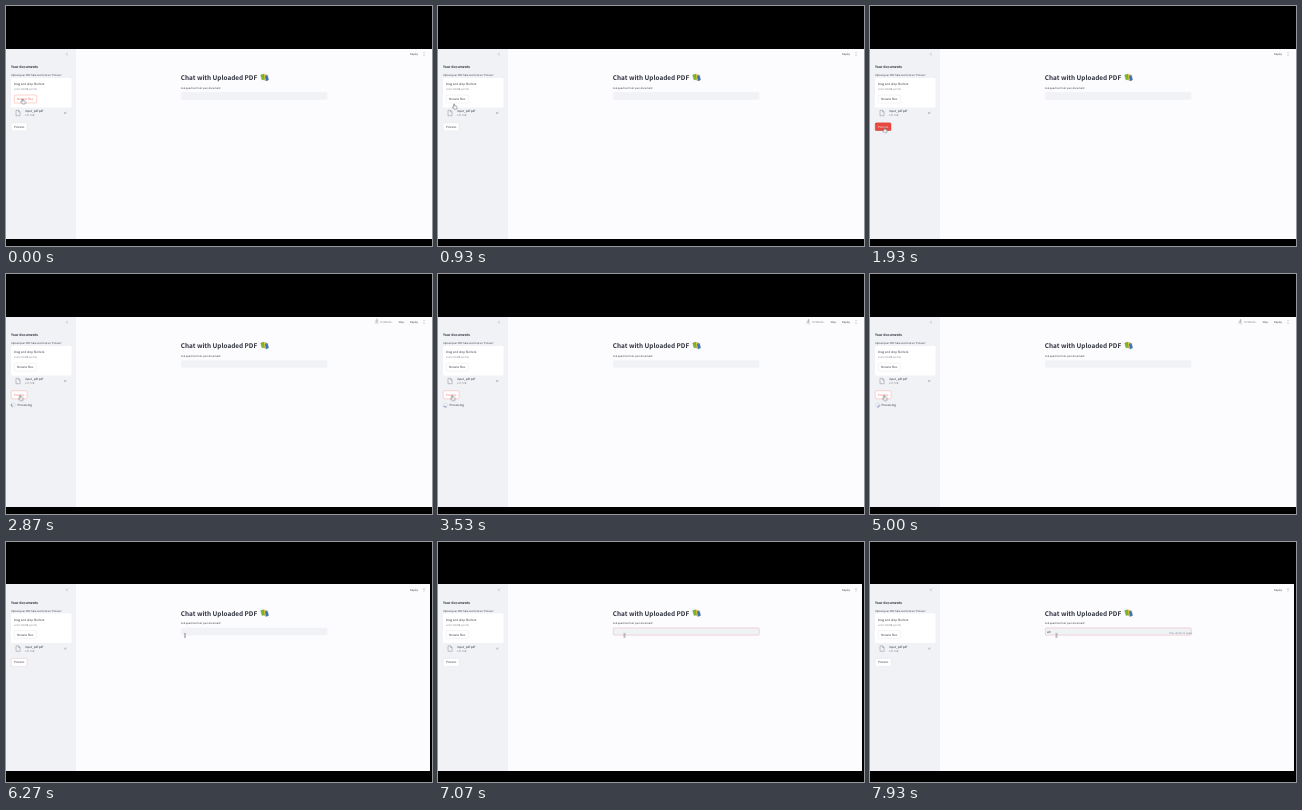
These frames come from a looping animation (426 by 240 pixels, 8000 ms). An HTML page:

```html
<!DOCTYPE html>
<html lang="en">
<head>
<meta charset="utf-8">
<title>Chat with Uploaded PDF</title>
<style>
  html, body { margin: 0; width: 100%; height: 100%; overflow: hidden; background: #000; }
  svg { display: block; width: 100vw; height: 100vh; }
  text {
    font: 2.86px "Noto Sans CJK JP", "Noto Sans CJK SC", "Noto Sans CJK", Lato, sans-serif;
    fill: #31333f;
    text-rendering: geometricPrecision;
  }
  .title { font-size: 6.4px; font-weight: 600; }
  .heading { font-size: 3.4px; font-weight: 600; }
  .label { font-size: 2.5px; }
  .muted { font-size: 2.5px; fill: #858793; }
  .button { fill: #fff; stroke: #d3d5dc; stroke-width: .3; }
  .line { fill: none; stroke: #73757f; stroke-width: .4; }

  .timed { animation: 8s step-end infinite; }
  .tall { animation-name: before-shift; }
  .short { animation-name: after-shift; }
  .content { animation-name: content; }
  .browse { animation-name: browse; }
  .browse-text { animation-name: browse-text; }
  .process { animation-name: process; }
  .process-text { animation-name: process-text; }
  .running { animation-name: running; }
  .input { animation-name: input; }
  .first { animation-name: first; }
  .second { animation-name: second; }
  .hand { animation-name: hand; }
  .beam { animation-name: beam; }
  .pointer { animation: pointer 8s ease-in-out infinite; }
  .spinner { animation: spin .8s linear infinite; transform-origin: 7.4px 131px; }
  .runner { animation: run .5s step-end infinite; }

  @keyframes before-shift {
    0% { visibility: visible; }
    69%, 100% { visibility: hidden; }
  }
  @keyframes after-shift {
    0% { visibility: hidden; }
    69%, 100% { visibility: visible; }
  }
  @keyframes content {
    0% { transform: none; }
    69%, 100% { transform: translateY(-.4px); }
  }
  @keyframes browse {
    0% { stroke: #ff6a50; }
    11%, 100% { stroke: #d3d5dc; }
  }
  @keyframes browse-text {
    0% { fill: #f0605a; }
    11%, 100% { fill: #31333f; }
  }
  @keyframes process {
    0% { fill: #fff; stroke: #d3d5dc; }
    17% { fill: #fff; stroke: #ff4b4b; }
    23% { fill: #e9483f; stroke: #b8322f; }
    25.5% { fill: #fff; stroke: #f0765f; }
    70% { fill: #fff; stroke: #d9a0b8; }
    82%, 100% { fill: #fff; stroke: #d3d5dc; }
  }
  @keyframes process-text {
    0% { fill: #31333f; }
    17% { fill: #ff4b4b; }
    23% { fill: #fff; }
    25.5% { fill: #e86a58; }
    70%, 100% { fill: #31333f; }
  }
  @keyframes running {
    0% { visibility: hidden; }
    26% { visibility: visible; }
    69%, 100% { visibility: hidden; }
  }
  @keyframes input {
    0% { stroke: #f0f2f6; }
    82%, 100% { stroke: #e3a0a4; }
  }
  @keyframes first {
    0% { visibility: hidden; }
    95.5%, 100% { visibility: visible; }
  }
  @keyframes second {
    0% { visibility: hidden; }
    98%, 100% { visibility: visible; }
  }
  @keyframes hand {
    0% { visibility: visible; }
    74%, 100% { visibility: hidden; }
  }
  @keyframes beam {
    0% { visibility: hidden; }
    74%, 100% { visibility: visible; }
  }
  @keyframes pointer {
    0%, 9% { transform: translate(16.5px, 93px); }
    18%, 69% { transform: translate(14.2px, 121.5px); }
    77%, 81% { transform: translate(179px, 93.5px); }
    86%, 100% { transform: translate(186.5px, 93.5px); }
  }
  @keyframes spin { to { transform: rotate(360deg); } }
  @keyframes run {
    0% { transform: none; }
    50%, 100% { transform: translate(.4px, -.4px); }
  }
</style>
</head>
<body>
<svg viewBox="0 0 426 240" preserveAspectRatio="none">
  <rect width="426" height="240"/>
  <g class="timed tall">
    <path d="M0 43h426v190H0z" fill="#fcfcfe"/>
    <path d="M0 43h70v190H0z" fill="#f0f2f6"/>
  </g>
  <g class="timed short">
    <path d="M0 42h424v187H0z" fill="#fcfcfe"/>
    <path d="M0 42h70v187H0z" fill="#f0f2f6"/>
  </g>

  <g class="timed content">
    <!-- Sidebar -->
    <path class="line" d="M61.5 47l-1.2 1.2 1.2 1.2"/>
    <text class="heading" x="5" y="62.4">Your documents</text>
    <text class="label" x="5" y="70">Upload your PDF here and click on 'Process'</text>
    <rect x="5" y="72" width="60.5" height="29.5" rx="1.2" fill="#fff"/>
    <text x="8" y="79.4">Drag and drop file here</text>
    <text class="muted" x="8" y="84.4">Limit 200MB per file</text>
    <rect class="button timed browse" x="8.3" y="89" width="22.4" height="8" rx="1.2"/>
    <text class="timed browse-text" x="11.3" y="94.1">Browse files</text>

    <path class="line" d="M10 104.3h2.6l1.5 1.6v3.8H10zM12.6 104.3v1.6h1.5"/>
    <text x="19" y="106.2">input_pdf.pdf</text>
    <text class="muted" x="19" y="110">237.7KB</text>
    <path class="line" d="M58.2 106l2 2m0-2l-2 2"/>

    <rect class="button timed process" x="5.2" y="116.8" width="15.8" height="8" rx="1.2"/>
    <text class="timed process-text" x="8" y="121.9">Process</text>
    <g class="timed running">
      <circle cx="7.4" cy="131" r="2" fill="none" stroke="#d5d8df" stroke-width=".6"/>
      <path class="spinner" d="M7.4 129a2 2 0 0 1 2 2" fill="none" stroke="#3c5fa0" stroke-width=".7"/>
      <text x="11.4" y="132">Processing</text>
    </g>

    <!-- Toolbar -->
    <g class="timed running">
      <g class="line runner">
        <circle cx="370.5" cy="46" r=".5"/>
        <path d="M370.4 46.9l-.5 1.6 1.3.8-.1 1M369.9 48.5l-1.4 1.4M368.7 47.7l1.6-.6 1.6.7"/>
      </g>
      <text class="muted" x="374.3" y="49">RUNNING...</text>
      <text class="label" x="392.5" y="49">Stop</text>
    </g>
    <text class="label" x="404" y="49">Deploy</text>
    <g fill="#50525e">
      <circle cx="418" cy="46.7" r=".35"/>
      <circle cx="418" cy="48" r=".35"/>
      <circle cx="418" cy="49.3" r=".35"/>
    </g>

    <!-- Chat -->
    <text class="title" x="174.8" y="74.2">Chat with Uploaded PDF</text>
    <g stroke-width=".3">
      <path d="M254.7 69l3-.9 1.3 5-3 .9z" fill="#79b833" stroke="#507e27"/>
      <path d="M257.8 68.4l2.4.2 1.3 5.5-2.8.4z" fill="#f2cf3a" stroke="#9b7e2b"/>
      <path d="M259.2 70l2.2-.7 1.2 4.5-2.3 1.1z" fill="#3b79bd" stroke="#294b78"/>
    </g>
    <text class="label" x="175" y="82.8">Ask question from your document:</text>
    <rect class="timed input" x="175.3" y="86.3" width="146" height="7.2" rx="1.2" fill="#f0f2f6" stroke-width=".4"/>
    <text class="timed first" x="177" y="91">w<tspan class="timed second">h</tspan></text>
    <text class="muted timed first" x="299.3" y="92.7">Press Enter to apply</text>
  </g>

  <g class="pointer">
    <path class="timed hand" d="M-.5 0q.6-.7 1 0v1.7l2 .5q.6.3.5 1l-.5 1.8H-.2l-1.5-2q.2-.7 1.2 0z" fill="#fff" stroke="#252731" stroke-width=".4"/>
    <path class="timed beam" d="M-.8-1.8q.8 0 .8.5 0-.5.8-.5M0-1.4v2.8M-.8 1.8q.8 0 .8-.5 0 .5.8.5" fill="none" stroke="#33353f" stroke-width=".5"/>
  </g>
</svg>
</body>
</html>
```
